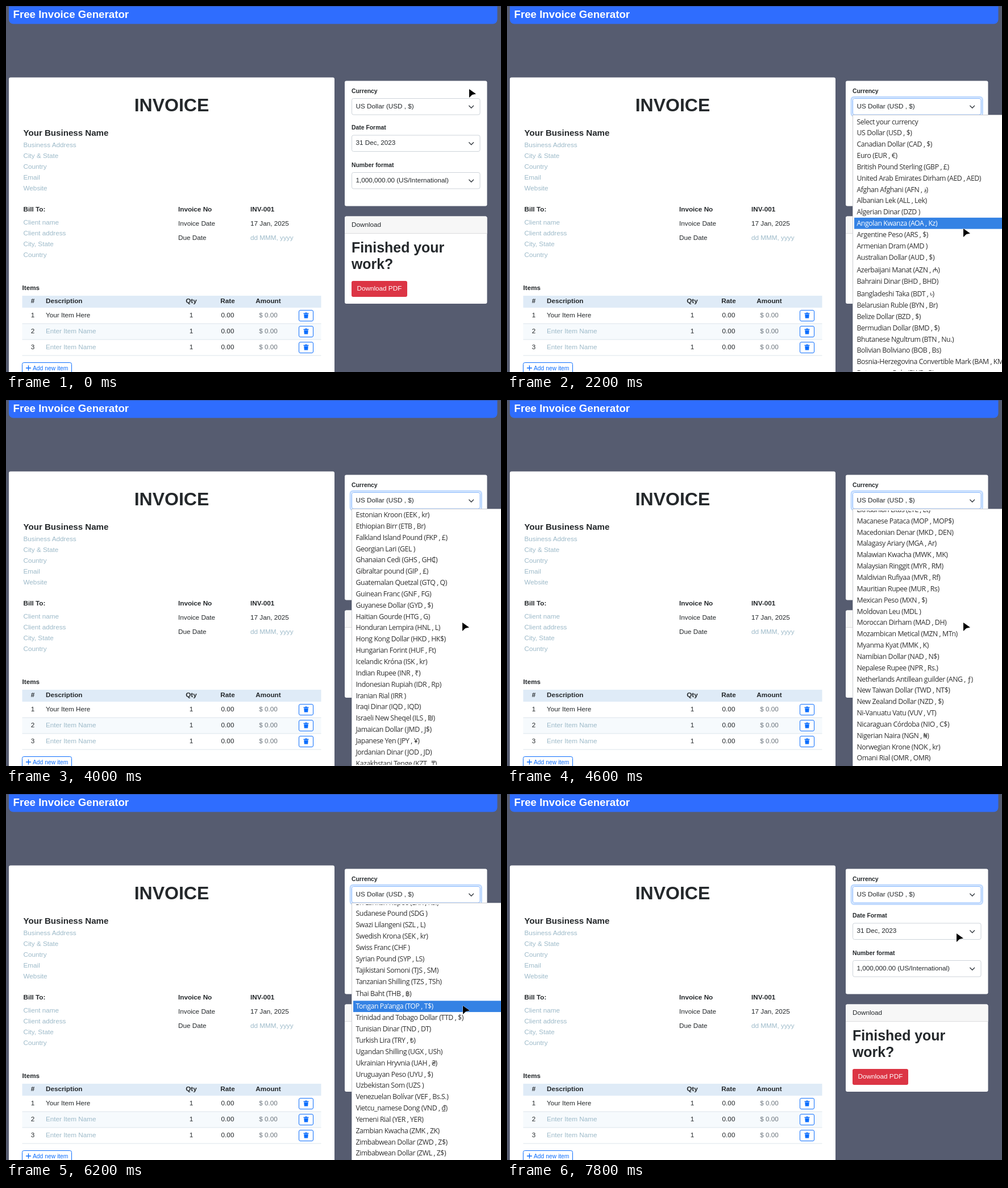
An HTML page for the animation above (8 s loop, 871x643 px).

```html
<!DOCTYPE html>
<html lang="en">
<head>
<meta charset="utf-8">
<title>Free Invoice Generator</title>
<style>
html, body { margin: 0; width: 100%; height: 100%; overflow: hidden; background: #565c70; }
svg { display: block; }
text { font-family: "Liberation Sans", Arial, sans-serif; font-size: 11.72px; fill: #24282b; white-space: pre; }
.b { font-weight: bold; }
.label { font-weight: bold; font-size: 10.4px; }
.ph { fill: #9dbac9; }
.grey { fill: #6c757d; }
.mid { text-anchor: middle; }
.box { fill: #fff; stroke: #ced4da; }
.btn { fill: #fff; stroke: #0d6efd; }
.chev { fill: none; stroke: #343a40; stroke-width: 1.4; stroke-linecap: round; stroke-linejoin: round; }
#list text { font-family: "Open Sans", "Noto Sans", sans-serif; font-size: 12.3px; letter-spacing: -.42px; fill: #303030; }
#list text.on { fill: #fff; }
</style>
</head>
<body>
<svg id="stage" width="871" height="643" viewBox="0 0 871 643">
  <defs><clipPath id="view"><rect x="609" y="194" width="262" height="447"/></clipPath></defs>
  <g id="page"></g>
  <g id="popup">
    <rect x="608.5" y="191.5" width="270" height="460" fill="#fff" stroke="#c9cbd0"/>
    <g clip-path="url(#view)">
      <rect id="hover" x="611" width="260" height="19.8" fill="#3482e4"/>
      <g id="list"></g>
    </g>
  </g>
  <path id="cursor" d="M0 0 L12 8.6 L5.2 10 L0 15 Z" fill="#000" stroke="#fff" stroke-width=".8" stroke-linejoin="round" paint-order="stroke"/>
</svg>
<script>
(() => {
const $ = id => document.getElementById(id);

function add(parent, tag, attrs, text) {
  const el = document.createElementNS("http://www.w3.org/2000/svg", tag);
  for (const k in attrs) el.setAttribute(k, attrs[k]);
  if (text) el.textContent = text;
  return parent.appendChild(el);
}
const page = $("page");
const rect = (x, y, width, height, more) => add(page, "rect", { x, y, width, height, ...more });
const path = (d, more) => add(page, "path", { d, ...more });
const write = (x, y, text, cls = "", size) =>
  add(page, "text", { x, y, class: cls, ...(size && { style: `font-size:${size}px` }) }, text);

// Header and invoice sheet
rect(5, -10, 859.5, 41.5, { rx: 8, fill: "#2f6dfe" });
rect(0, 0, 871, 1, { fill: "#3d4a78", opacity: .6 });
write(12.5, 20.5, "Free Invoice Generator", "b", 18.7).style.fill = "#fff";
rect(5, 125.5, 573, 540, { rx: 3, fill: "#fff" });
write(291.5, 184.5, "INVOICE", "b mid", 32);
write(30.5, 227.5, "Your Business Name", "b", 15.1);
["Business Address", "City & State", "Country", "Email", "Website"]
  .forEach((s, i) => write(30.5, 247.5 + 19.1 * i, s, "ph"));
write(30.5, 360.5, "Bill To:", "b");
["Client name", "Client address", "City, State", "Country"]
  .forEach((s, i) => write(30.5, 383.5 + 19 * i, s, "ph"));
[["Invoice No", "INV-001", "b", "b"], ["Invoice Date", "17 Jan, 2025", "", ""], ["Due Date", "dd MMM, yyyy", "", "ph"]]
  .forEach(([k, v, a, b], i) => {
    write(303, 361 + 25 * i, k, a);
    write(430, 361 + 25 * i, v, b);
  });

// Items table
write(28.5, 498.5, "Items", "b");
rect(28.5, 509, 526, 21, { fill: "#dfebf7" });
rect(28.5, 558, 526, 28, { fill: "#f6fafd" });
const columns = (y, cells, cls, last) => {
  [47, 70, 326, 390, 461.5].forEach((x, i) =>
    write(x, y, cells[i], i === 1 ? cls : `${i === 4 ? last : cls === "b" ? "b" : ""} mid`));
};
columns(522, ["#", "Description", "Qty", "Rate", "Amount"], "b", "b");
["Your Item Here", "Enter Item Name", "Enter Item Name"].forEach((s, i) => {
  const y = 28 * i;
  columns(547 + y, [i + 1, s, "1", "0.00", "$ 0.00"], i ? "ph" : "", "grey");
  rect(28.5, 557.5 + y, 526, 1, { fill: "#dde5ec" });
  rect(515.5, 534.5 + y, 25, 19, { rx: 2.5, class: "btn" });
  path(`M523.5 ${539.5 + y}h3v-1h3v1h3v1.5h-9z M524.2 ${541.6 + y}h7.6l-.6 7h-6.4z`, { fill: "#0d6efd" });
});
rect(28.5, 626.5, 87, 30, { rx: 3, class: "btn" });
path("M35 636h9M39.5 631.5v9", { stroke: "#0d6efd", "stroke-width": 1.4 });
write(47, 640, "Add new item", "", 10.3).style.fill = "#0d6efd";

// Settings and download cards
rect(596, 131.5, 250.5, 220, { rx: 3, fill: "#fff" });
const ring = rect(606, 160, 230.5, 33.5, { rx: 4.5, fill: "none", stroke: "#c2dbfe", "stroke-width": 3 });
const boxes = [["Currency", "US Dollar (USD , $)", 162.5], ["Date Format", "31 Dec, 2023", 227], ["Number format", "1,000,000.00 (US/International)", 292.5]]
  .map(([label, value, y]) => {
    write(608, y - 10, label, "label");
    const box = rect(608.5, y, 225.5, 28.5, { rx: 3, class: "box" });
    write(615.5, y + 17, value);
    path(`M814.8 ${y + 12.8}l3.9 3.9l3.9 -3.9`, { class: "chev" });
    return box;
  });
rect(596, 369.5, 250.5, 153.5, { rx: 3, fill: "#fff" });
path("M596 399.5v-27a3 3 0 0 1 3-3h244.5a3 3 0 0 1 3 3v27z", { fill: "#f7f7f7" });
rect(596, 399, 250.5, 1, { fill: "#dcdcdd" });
write(608, 388, "Download");
write(608, 432.5, "Finished your", "b", 24.9);
write(608, 461.5, "work?", "b", 24.9);
rect(608, 483, 98, 28, { rx: 3, fill: "#dc3545" });
write(617.5, 499.5, "Download PDF").style.fill = "#fff";

// Currency list
const names = `Select your currency
US Dollar (USD , $)
Canadian Dollar (CAD , $)
Euro (EUR , €)
British Pound Sterling (GBP , £)
United Arab Emirates Dirham (AED , AED)
Afghan Afghani (AFN , ؋)
Albanian Lek (ALL , Lek)
Algerian Dinar (DZD )
Angolan Kwanza (AOA , Kz)
Argentine Peso (ARS , $)
Armenian Dram (AMD )
Australian Dollar (AUD , $)
Azerbaijani Manat (AZN , ₼)
Bahraini Dinar (BHD , BHD)
Bangladeshi Taka (BDT , ৳)
Belarusian Ruble (BYN , Br)
Belize Dollar (BZD , $)
Bermudian Dollar (BMD , $)
Bhutanese Ngultrum (BTN , Nu.)
Bolivian Boliviano (BOB , Bs)
Bosnia-Herzegovina Convertible Mark (BAM , KM)
Botswanan Pula (BWP , P)
Brazilian Real (BRL , R$)
Brunei Dollar (BND , $)
Bulgarian Lev (BGN , лв)
Burundian Franc (BIF , FBu)
Cambodian Riel (KHR )
Cape Verdean Escudo (CVE , $)
Cayman Islands dollar (KYD , $)
CFA Franc BCEAO (XOF , CFA)
CFA Franc BEAC (XAF , FCFA)
CFP franc (XPF , F)
Chilean Peso (CLP , $)
Chinese Yuan (CNY , CN¥)
Colombian Peso (COP , $)
Comorian Franc (KMF , CF)
Congolese Franc (CDF , FC)
Costa Rican Colón (CRC , ₡)
Croatian Kuna (HRK , kn)
Czech Republic Koruna (CZK , Kč)
Danish Krone (DKK , kr.)
Djiboutian Franc (DJF , Fdj)
Dominican Peso (DOP , RD$)
East Caribbean Dollar (XCD , $)
Egyptian Pound (EGP , E£)
Eritrean Nakfa (ERN , Nfk)
Estonian Kroon (EEK , kr)
Ethiopian Birr (ETB , Br)
Falkland Island Pound (FKP , £)
Georgian Lari (GEL )
Ghanaian Cedi (GHS , GH₵)
Gibraltar pound (GIP , £)
Guatemalan Quetzal (GTQ , Q)
Guinean Franc (GNF , FG)
Guyanese Dollar (GYD , $)
Haitian Gourde (HTG , G)
Honduran Lempira (HNL , L)
Hong Kong Dollar (HKD , HK$)
Hungarian Forint (HUF , Ft)
Icelandic Króna (ISK , kr)
Indian Rupee (INR , ₹)
Indonesian Rupiah (IDR , Rp)
Iranian Rial (IRR )
Iraqi Dinar (IQD , IQD)
Israeli New Sheqel (ILS , ₪)
Jamaican Dollar (JMD , J$)
Japanese Yen (JPY , ¥)
Jordanian Dinar (JOD , JD)
Kazakhstani Tenge (KZT , ₸)
Kenyan Shilling (KES , Ksh)
Kuwaiti Dinar (KWD , KD)
Kyrgystani Som (KGS )
Laotian Kip (LAK , ₭)
Latvian Lats (LVL , Ls)
Lebanese Pound (LBP , LB£)
Lesotho Loti (LSL , L)
Liberian Dollar (LRD , $)
Libyan Dinar (LYD , LD)
Lithuanian Litas (LTL , Lt)
Macanese Pataca (MOP , MOP$)
Macedonian Denar (MKD , DEN)
Malagasy Ariary (MGA , Ar)
Malawian Kwacha (MWK , MK)
Malaysian Ringgit (MYR , RM)
Maldivian Rufiyaa (MVR , Rf)
Mauritian Rupee (MUR , Rs)
Mexican Peso (MXN , $)
Moldovan Leu (MDL )
Moroccan Dirham (MAD , DH)
Mozambican Metical (MZN , MTn)
Myanma Kyat (MMK , K)
Namibian Dollar (NAD , N$)
Nepalese Rupee (NPR , Rs.)
Netherlands Antillean guilder (ANG , ƒ)
New Taiwan Dollar (TWD , NT$)
New Zealand Dollar (NZD , $)
Ni-Vanuatu Vatu (VUV , VT)
Nicaraguan Córdoba (NIO , C$)
Nigerian Naira (NGN , ₦)
Norwegian Krone (NOK , kr)
Omani Rial (OMR , OMR)
Pakistani Rupee (PKR , Rs)
Panamanian Balboa (PAB , B/.)
Papua New Guinean Kina (PGK , K)
Paraguayan Guarani (PYG , ₲)
Peruvian Nuevo Sol (PEN , S/.)
Philippine Peso (PHP , ₱)
Polish Zloty (PLN , zł)
Qatari Rial (QAR , QR)
Romanian Leu (RON , lei)
Russian Ruble (RUB , ₽)
Rwandan Franc (RWF , FRw)
Saint Helena pound (SHP , £)
Samoan Tala (WST , T)
Saudi Riyal (SAR , SR)
Serbian Dinar (RSD , din.)
Seychellois Rupee (SCR , SR)
Sierra Leonean Leone (SLL , Le)
Singapore Dollar (SGD , S$)
Solomon Islands Dollar (SBD , $)
Somali Shilling (SOS , Ssh)
South African Rand (ZAR , R)
South Korean Won (KRW , ₩)
South Sudanese pound (SSP , £)
Sri Lankan Rupee (LKR , Rs.)
Sudanese Pound (SDG )
Swazi Lilangeni (SZL , L)
Swedish Krona (SEK , kr)
Swiss Franc (CHF )
Syrian Pound (SYP , LS)
Tajikistani Somoni (TJS , SM)
Tanzanian Shilling (TZS , TSh)
Thai Baht (THB , ฿)
Tongan Paʻanga (TOP , T$)
Trinidad and Tobago Dollar (TTD , $)
Tunisian Dinar (TND , DT)
Turkish Lira (TRY , ₺)
Ugandan Shilling (UGX , USh)
Ukrainian Hryvnia (UAH , ₴)
Uruguayan Peso (UYU , $)
Uzbekistan Som (UZS )
Venezuelan Bolívar (VEF , Bs.S.)
Vietcu_namese Dong (VND , ₫)
Yemeni Rial (YER , YER)
Zambian Kwacha (ZMK , ZK)
Zimbabwean Dollar (ZWD , Z$)
Zimbabwean Dollar (ZWL , Z$)`.split("\n");

// Rows with tall glyphs get extra space above and below
const tall = { AZN: [2.15, .65], BDT: [1.65, .65], THB: [2.15, 2.15] };
const PITCH = 19.84;
let listEnd = 193.3;
const rows = names.map(name => {
  const code = name.slice(name.indexOf("(") + 1).slice(0, 3);
  const [above, below] = tall[code] || [0, 0];
  const mid = listEnd + above + PITCH / 2;
  listEnd += PITCH + above + below;
  const el = add($("list"), "text", { x: 615.5, y: Math.round(mid + 4.3) }, name);
  return { code, mid, end: listEnd, el };
});

// Scroll offset that puts a currency's row at height y
const offset = (code, y) => rows.find(r => r.code === code).mid - y;
const cfa = offset("XOF", 215), mac = offset("MOP", 212.5),
  ssp = offset("SSP", 207.5), lkr = offset("LKR", 203.2), last = listEnd - 641;

// time, cursor x, cursor y, scroll, highlight y (0 = none); no scroll = list closed
const steps = [
  [0, 815, 146],
  [400, 811, 166],
  [600, 808.5, 183],
  [1200, 808.5, 183, 0, 223],
  [1800, 806, 246, 0, 246],
  [2000, 804, 336, 0, 336],
  [2200, 803, 391, 0, 384],
  [2400, 803, 391, 150, 0],
  [2800, 803, 391, cfa - 150, 0],
  [3200, 803, 391, cfa, 0],
  [3600, 803, 391, cfa + 150, 0],
  [4000, 803, 391, cfa + 350, 0],
  [4200, 803, 391, cfa + 560, 0],
  [4400, 803, 391, mac - 210, 0],
  [4600, 803, 391, mac, 0],
  [4800, 803, 391, mac + 240, 0],
  [5000, 803, 391, mac + 520, 0],
  [5400, 803, 391, ssp, 0],
  [5600, 803, 391, last, 0],
  [6200, 804, 372, last, 372],
  [6400, 806, 320, last, 320],
  [6600, 808, 258, last, 258],
  [6800, 810, 198, lkr, 203],
  [7000, 811, 137, lkr, 203],
  [7200, 811, 137],
  [7400, 808, 160],
  [7600, 799, 208],
  [7800, 791, 245]
];

let shown, lit;
function show(step) {
  const [t, x, y, scroll, hoverY] = step, open = scroll !== undefined, focus = t >= 1200;
  $("cursor").setAttribute("transform", `translate(${x} ${y})`);
  ring.style.display = focus ? "" : "none";
  boxes[0].style.stroke = focus ? "#86b7fe" : "";
  $("popup").style.display = open ? "" : "none";
  if (!open) return;
  const shift = Math.round(scroll);
  $("list").setAttribute("transform", `translate(0 ${-shift})`);
  if (lit) lit.el.classList.remove("on");
  lit = hoverY && rows.find(r => r.end - shift > hoverY);
  $("hover").style.display = lit ? "" : "none";
  if (lit) {
    lit.el.classList.add("on");
    $("hover").setAttribute("y", lit.mid - shift - PITCH / 2);
  }
}

const start = performance.now();
function tick() {
  const t = (performance.now() - start) % 8000;
  const step = steps.findLast(s => s[0] <= t);
  if (step !== shown) show(shown = step);
  requestAnimationFrame(tick);
}
tick();
})();
</script>
</body>
</html>
```
